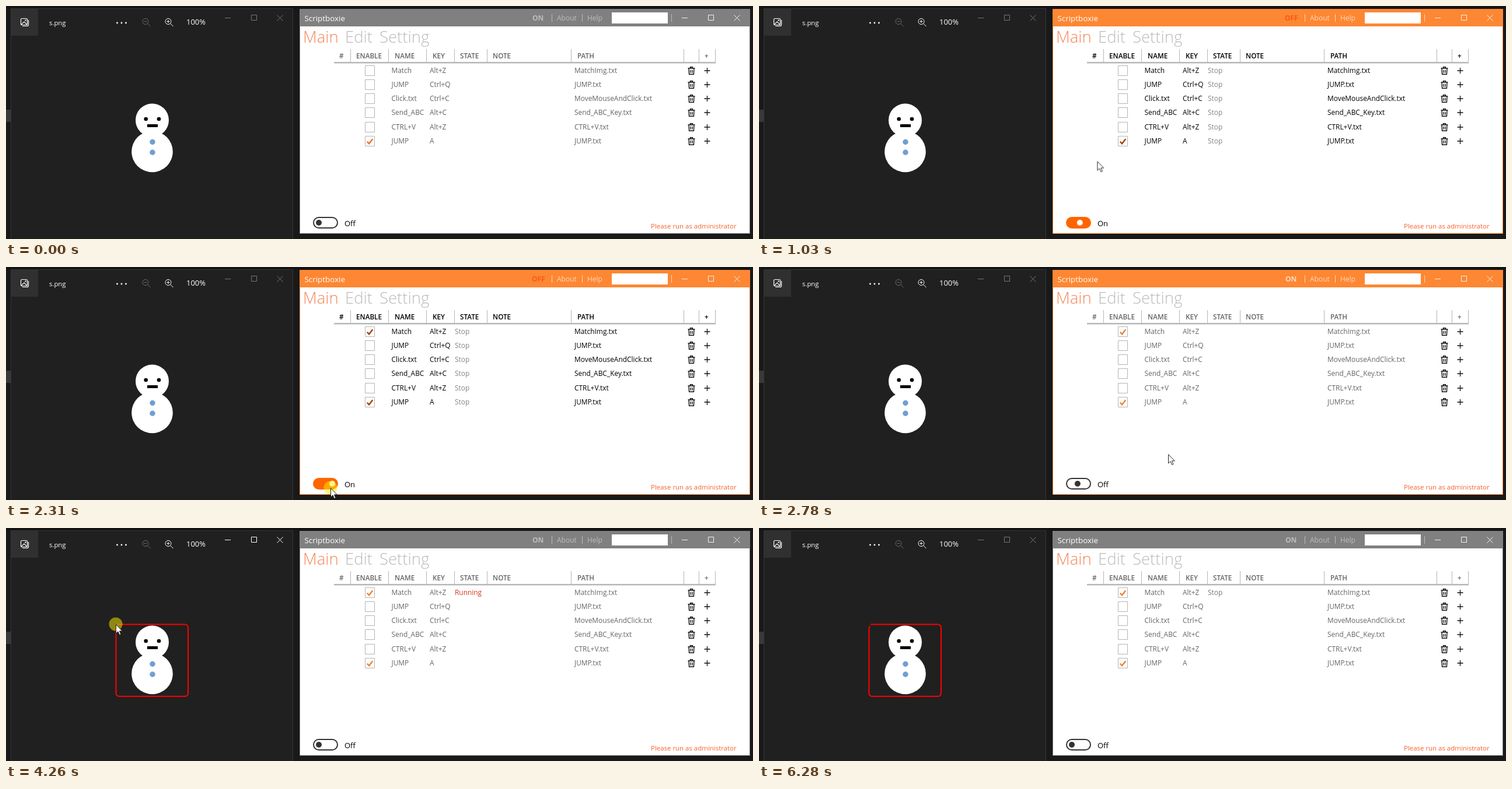
Write an HTML page that moves like this. It is 1280 px wide and 400 px high and loops after 6350 ms.

```html
<!DOCTYPE html>
<html lang="en">
<head>
<meta charset="utf-8">
<title>Script runner demo</title>
<style>
html, body { margin: 0; width: 100%; height: 100%; overflow: hidden; background: #191919; }
svg { display: block; width: 1280px; height: 400px; font: 11.9px "Open Sans", "Noto Sans", sans-serif;
  --bar: #808080; --soft: #bdbdbd; --ink: #636363; --tick: #f4702c; --cap: #777; }
svg, .anim { animation: 6350ms step-end infinite; }
svg { animation-name: theme; }

@keyframes theme {
  0% { --bar: #808080; --soft: #bdbdbd; --ink: #636363; --tick: #f4702c; --cap: #777; }
  10.86% { --bar: #fd8733; --soft: #fdd9bd; }
  12.91% { --ink: #000; --tick: #a84000; }
  38.58% { --ink: #666; --tick: #ef8333; }
  67.08% { --bar: #808080; --soft: #bdbdbd; --cap: #fff; }
  98.89% { --cap: #777; }
}

.live { animation-name: live; }
@keyframes live { 0% { opacity: 0; } 12.91% { opacity: 1; } 38.58%, 100% { opacity: 0; } }
.idle { animation-name: idle; }
@keyframes idle { 0% { opacity: 1; } 12.91% { opacity: 0; } 38.58%, 100% { opacity: 1; } }
.ticked { animation-name: ticked; }
@keyframes ticked { 0% { opacity: 0; } 28.02%, 100% { opacity: 1; } }
.hover { animation-name: hover; }
@keyframes hover { 0% { opacity: 0; } 22.51% { opacity: 1; } 34.32%, 100% { opacity: 0; } }
.running { animation-name: running; }
@keyframes running { 0% { opacity: 0; } 63.93% { opacity: 1; } 80.78%, 100% { opacity: 0; } }
.stopped { animation-name: stopped; }
@keyframes stopped { 0% { opacity: 0; } 80.78%, 100% { opacity: 1; } }
.found { animation-name: found; }
@keyframes found { 0% { opacity: 0; } 67.08%, 100% { opacity: 1; } }
.press { animation-name: press; }
@keyframes press {
  0%, 12.91%, 28.02%, 38.58%, 71.33%, 100% { opacity: 0; }
  10.86%, 25.82%, 36.37%, 67.08% { opacity: .5; }
}

.track { animation-name: track; }
@keyframes track {
  0%, 38.58%, 100% { fill: #fff; stroke: #333; }
  10.86% { fill: #6b6b6b; stroke: #6b6b6b; }
  12.91% { fill: #fe6500; stroke: #fe6500; }
}
.knob { animation-name: knob, slide; }
@keyframes knob { 0%, 38.58%, 100% { fill: #333; } 10.86% { fill: #fff; } }
@keyframes slide {
  0% { transform: none; }
  12.91% { transform: translate(0, 0); animation-timing-function: steps(5); }
  18.26% { transform: translate(23px, 0); }
  38.58% { transform: translate(23px, 0); animation-timing-function: steps(7); }
  45.98%, 100% { transform: translate(0, 0); }
}

.cursor { animation-name: move; }
@keyframes move {
  0% { transform: translate(640px, 420px); }
  2.04% { transform: translate(632px, 396px); animation-timing-function: steps(7); }
  9.76% { transform: translate(551px, 371px); }
  11.86% { transform: translate(551px, 371px); animation-timing-function: steps(10); }
  22.51% { transform: translate(622px, 109px); }
  33.22% { transform: translate(622px, 109px); animation-timing-function: steps(3); }
  36.37% { transform: translate(556px, 379px); }
  38.58% { transform: translate(556px, 379px); animation-timing-function: steps(5); }
  43.77% { transform: translate(701px, 321px); animation-timing-function: steps(4); }
  48.34% { transform: translate(784px, 306px); }
  50.55% { transform: translate(787px, 308px); }
  51.49% { transform: translate(791px, 310px); }
  67.08% { transform: translate(188px, 165px); }
  79.68% { transform: translate(188px, 165px); animation-timing-function: steps(8); }
  88.18% { transform: translate(878px, 315px); animation-timing-function: steps(2); }
  90.39% { transform: translate(1083px, 360px); }
  91.49% { transform: translate(1108px, 366px); }
  92.59% { transform: translate(1130px, 373px); }
  93.7%, 100% { transform: translate(640px, 420px); }
}

.line { fill: none; stroke-width: 1; }
.ink { fill: var(--ink); }
.soft { fill: var(--soft); }
.head { font-size: 11.7px; font-weight: 600; }
.tab { font-size: 27.5px; font-weight: 300; fill: #b9bcb8; }
.tick { fill: none; stroke: var(--tick); stroke-width: 2.4; }
</style>
</head>
<body>
<svg viewBox="0 0 1280 400">
  <defs>
    <g id="caption" class="line">
      <path d="M0 20.5h10M45.5 15.5h9v9h-9zM89.5 15.5l10 10m0-10l-10 10"/>
    </g>
    <g id="lens" class="line">
      <circle cx="-1" cy="-1" r="5"/><path d="M2.8 2.8l4.7 4.7M-3.5-1h5"/>
    </g>
    <g id="bin" class="line" stroke="#111" style="stroke-width:1.4">
      <path d="M-6-4h12M-2-4v-2.2h4V-4M-4.5-4l.6 10.3h7.8L4.5-4M-1.5-1.3v5M1.5-1.3v5"/>
    </g>
    <path id="plus" d="M-5 0H5M0-5V5" stroke="#111" stroke-width="1.3"/>
    <path id="check" class="tick" d="M-4.7 .2L-1.4 3.8 4.8-4.2"/>
  </defs>

  <!-- Image viewer -->
  <path fill="#141414" d="M0 0h1280v4H0z"/>
  <path fill="#393939" d="M0 178h8v21H0z"/>
  <path fill="#202020" stroke="#363636" d="M8.500 4.500h483V402H8.500z"/>
  <path fill="#303030" d="M9 5h46v46H9z"/>
  <g class="line" stroke="#fff" style="stroke-width:1.2">
    <rect x="25.500" y="21.500" width="11" height="11" rx="2"/>
    <path d="M28 34.500h8q2.500 0 2.500-2.500v-8M26.500 31.500l4.500-4.500 4.500 4.500"/>
    <circle cx="33.500" cy="24.500" r=".6"/>
  </g>
  <g fill="#fff">
    <text x="74" y="33" font-size="11.300">s.png</text>
    <circle cx="190.500" cy="29" r="1.400"/><circle cx="198" cy="29" r="1.400"/><circle cx="205.500" cy="29" r="1.400"/>
    <text x="309" y="32" font-size="13">100%</text>
  </g>
  <use href="#lens" x="240" y="27.500" stroke="#6c6c6c"/>
  <g stroke="#fff"><use href="#lens" x="279" y="27.500"/><path d="M278 24v5"/></g>
  <use href="#caption" x="375" style="stroke:var(--cap)"/>

  <g fill="#fff"><circle cx="250.500" cy="196" r="28.500"/><circle cx="250.500" cy="250" r="35.300"/></g>
  <circle cx="239.700" cy="194" r="3.300"/><circle cx="262" cy="194" r="3.300"/>
  <path d="M242 203h18v5h-18z"/>
  <g fill="#6f9fd4"><circle cx="251" cy="233.500" r="4.700"/><circle cx="251" cy="251.300" r="4.700"/></g>
  <path class="anim found" fill="none" stroke="#f00" stroke-width="2"
    d="M191 165.500H306q6 0 6 6V283q0 6-6 6H194.500q-6 0-6-6V173l1-5"/>

  <!-- Script window -->
  <path fill="#fff" style="stroke:var(--bar)" d="M503.500 5.500h771v385h-771z"/>
  <path style="fill:var(--bar)" d="M503 5h772v30H503z"/>
  <text x="511.500" y="25.500" font-size="13.400" fill="#fff">Scriptboxie</text>
  <g class="soft" font-size="12">
    <text class="anim idle" x="902" y="25" font-weight="700">ON</text>
    <text class="anim live" x="901" y="25" font-weight="700" fill="#f95a14" style="fill:#f95a14">OFF</text>
    <text x="944" y="25" font-weight="500">About</text>
    <text x="996" y="25" font-weight="500">Help</text>
  </g>
  <path class="line" style="stroke:var(--soft)" d="M935.500 14v13M987.500 14v13M1140.500 14v13"/>
  <path fill="#fff" d="M1038 11h96v19h-96z"/>
  <use href="#caption" x="1158" stroke="#f4f4f4"/>
  <text class="tab" x="509" y="63" style="fill:#f4865a">Main</text>
  <text class="tab" x="581" y="63">Edit</text>
  <text class="tab" x="640" y="63">Setting</text>

  <path class="line" stroke="#b5b5b5" d="M590.500 74v23M655.500 74v23M720.500 74v23M768.500 74v23M824.500 74v23M968.500 74v23M1161.500 74v23M1187.500 74v23M1215.500 74v23"/>
  <path fill="#b7b7b7" d="M562 96h654v2.500H562z"/>
  <path class="anim hover" fill="#fda467" d="M591 99h64v24h-64z"/>
  <g id="grid"></g>
  <text class="anim running" x="769" y="115" fill="#d8341f">Running</text>
  <text class="anim stopped" x="769" y="115" fill="#777">Stop</text>

  <rect class="anim track" x="527" y="363" width="41" height="18" rx="9" stroke-width="2"/>
  <circle class="anim knob" cx="536" cy="372" r="5"/>
  <g font-size="13">
    <text class="anim idle" x="580" y="378">Off</text>
    <text class="anim live" x="580" y="378">On</text>
  </g>
  <text x="1105" y="382" font-size="11.450" fill="#f4612a">Please run as administrator</text>

  <g class="anim cursor">
    <circle class="anim press" r="11.500" fill="#fff000"/>
    <path fill="#fff" stroke="#222" d="M.5.8V16l3.500-3.300 2.500 5.800 2.400-1-2.400-5.600h4.800z"/>
  </g>
</svg>
<script>
const heads = [[571, "#"], [600, "ENABLE"], [666, "NAME"], [731, "KEY"], [778, "STATE"],
  [834, "NOTE"], [979, "PATH"], [1197, "+"]];
const rows = [
  ["Match", "Alt+Z", "MatchImg.txt"],
  ["JUMP", "Ctrl+Q", "JUMP.txt"],
  ["Click.txt", "Ctrl+C", "MoveMouseAndClick.txt"],
  ["Send_ABC", "Alt+C", "Send_ABC_Key.txt"],
  ["CTRL+V", "Alt+Z", "CTRL+V.txt"],
  ["JUMP", "A", "JUMP.txt"]
];
const label = (x, y, text, cls = "ink") => `<text class="${cls}" x="${x}" y="${y}">${text}</text>`;

function row([name, key, path], i) {
  const y = Math.round(111 + i * 24.15), base = y + 4;
  const check = `<use href="#check" x="623.5" y="${y + .5}"/>`;
  const mark = i === 0 ? `<g class="anim ticked">${check}</g>` : i === 5 ? check : "";
  return `<path fill="#fff" stroke="#b4b4b4" d="M615.5 ${y - 8.5}h16v17h-16z"/>${mark}`
    + label(660.5, base, name) + label(726, base, key) + label(974, base, path)
    + `<g fill="#858585">${label(769, base, "Stop", "anim live")}</g>`
    + `<use href="#bin" x="1174.5" y="${y}"/><use href="#plus" x="1201.5" y="${y}"/>`;
}

document.getElementById("grid").innerHTML =
  heads.map(([x, text]) => label(x, 90, text, "ink head")).join("") + rows.map(row).join("");
</script>
</body>
</html>
```
